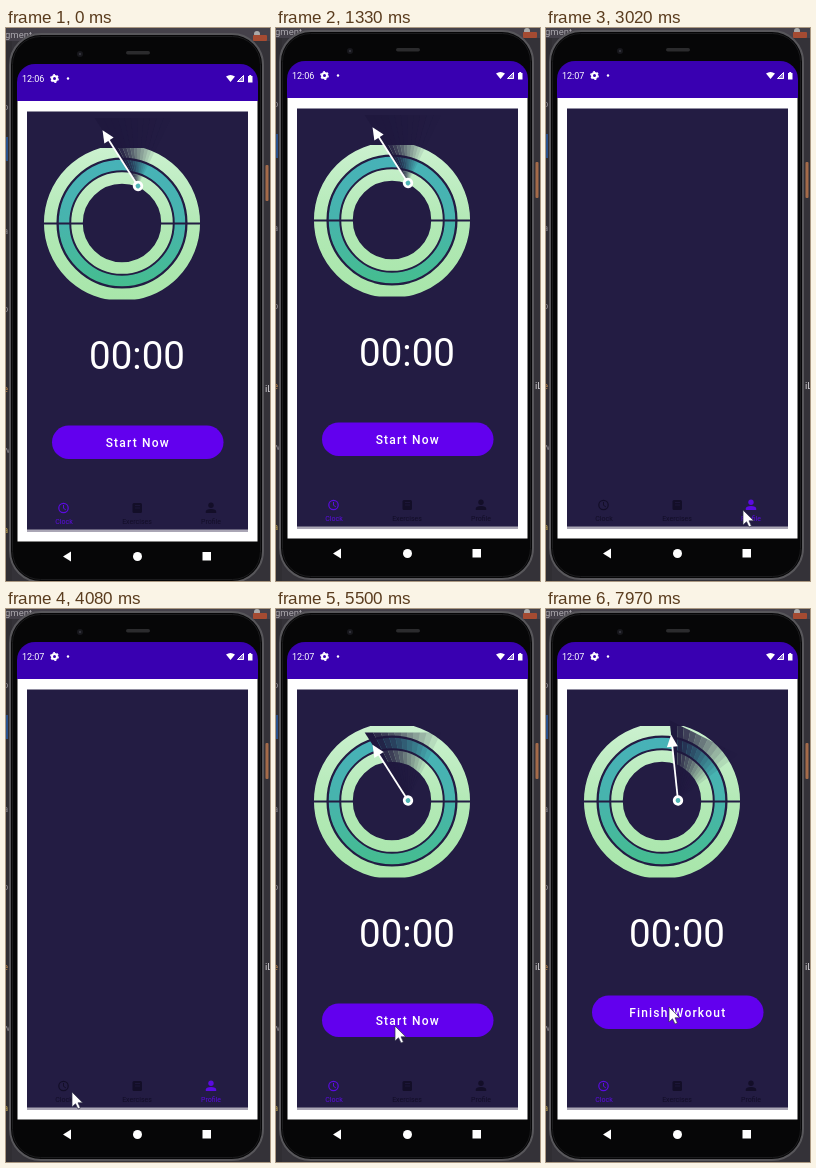
Recreate the animation shown at these times as an HTML page. Size 264 by 553 pixels, loop 8 s.

```html
<!DOCTYPE html>
<html lang="en">
<head>
<meta charset="utf-8">
<title>Workout clock</title>
<style>
html, body { margin: 0; width: 100%; height: 100%; overflow: hidden; background: #343238; }
svg { display: block; width: 264px; height: 553px; font-family: Roboto, sans-serif; }
.label { font-size: 7px; text-anchor: middle; }
.tab { color: #130e28; }
.tab.active { color: #5b0be0; }
.center { text-anchor: middle; fill: #fff; }
</style>
</head>
<body>
<svg viewBox="0 0 264 553">
  <defs>
    <linearGradient id="pale" gradientUnits="userSpaceOnUse" x1="0" y1="117" x2="0" y2="268">
      <stop offset="0" stop-color="#cbf1cf"/><stop offset=".5" stop-color="#b3e9b6"/><stop offset="1" stop-color="#a8e6aa"/>
    </linearGradient>
    <linearGradient id="teal" gradientUnits="userSpaceOnUse" x1="0" y1="129" x2="0" y2="255">
      <stop offset="0" stop-color="#47b2b8"/><stop offset=".5" stop-color="#47b4ad"/><stop offset="1" stop-color="#45bd8f"/>
    </linearGradient>
    <clipPath id="dial"><rect x="36" y="117" width="160" height="151.5"/></clipPath>
    <clipPath id="panel"><rect x="21" y="80" width="221" height="421"/></clipPath>
  </defs>

  <g id="stage">
    <rect y="-5" width="264" height="565" fill="#343238"/>
    <rect y="-5" width="264" height="15" fill="#45414a"/>
    <rect x="0" y="10" width="6" height="550" fill="#302e33"/>
    <g font-size="9.5" fill="#aaa7ad">
      <text x="-1" y="7">gment</text>
      <text x="259" y="361" fill="#d0ced2">iL</text>
      <g fill="#89868c">
        <text x="-3" y="79">o</text><text x="-3" y="203">a</text><text x="-3" y="281">p</text>
        <text x="-3" y="361" fill="#c18a4c">e</text><text x="-3" y="422">w</text><text x="-3" y="502" fill="#c4a650">a</text>
      </g>
    </g>
    <rect x="0" y="106" width="2" height="24" fill="#28518c"/>
    <rect x="259.5" y="134" width="3" height="36" rx="1" fill="#a36a49"/>
    <circle cx="251" cy="3" r="3" fill="#aaa"/>
    <rect x="247" y="4" width="14" height="6" rx="1" fill="#a54b32"/>

    <rect x="4" y="3" width="253" height="548" rx="31" fill="#060607" stroke="#58575b" stroke-width="2"/>
    <rect x="6.5" y="5.5" width="248" height="543" rx="28" fill="none" stroke="#1b1b1d"/>
    <circle cx="74" cy="23" r="3" fill="#17171c"/><circle cx="74" cy="23" r="1.2" fill="#34343c"/>
    <rect x="120" y="20" width="24" height="3.5" rx="1.7" fill="#2b2b2d"/>

    <path d="M11 70V51a18 18 0 0 1 18-18H234a18 18 0 0 1 18 18V70z" fill="#3900b1"/>
    <rect x="11.5" y="70" width="240" height="440.5" fill="#fff"/>
    <rect x="21" y="80.5" width="221" height="420" fill="#231c43"/>
    <rect x="21" y="498.5" width="221" height="2.5" fill="#aaa6b5"/>

    <g fill="#fff">
      <text id="time" x="16" y="51" font-size="9"></text>
      <circle cx="48.5" cy="47.5" r="2.5" fill="none" stroke="#fff" stroke-width="2"/>
      <circle cx="48.5" cy="47.5" r="3.8" fill="none" stroke="#fff" stroke-width="1.2" stroke-dasharray="2 1.98"/>
      <circle cx="62" cy="47.5" r="1.2"/>
      <path d="M220 45.5q4.500-3 9 0L224.500 51z"/>
      <path d="M238 44v7h-7z" fill-opacity=".45"/><path d="M237.500 44.500v6h-6z" fill="none" stroke="#fff"/>
      <path d="M242 45h1.200v-1h2v1h1.300v6.500H242z"/>
      <path d="M57 525.500l8-5v10z"/>
      <circle cx="131.500" cy="525.500" r="4.500"/>
      <rect x="196.500" y="521" width="8.500" height="8.500"/>
    </g>

    <g id="workout" clip-path="url(#panel)">
      <g clip-path="url(#dial)" fill="none">
        <circle cx="116" cy="192" r="71.800" stroke="url(#pale)" stroke-width="12.500"/>
        <circle cx="116" cy="192" r="58" stroke="url(#teal)" stroke-width="10.500"/>
        <circle cx="116" cy="192" r="45" stroke="url(#pale)" stroke-width="11.500"/>
        <path d="M36 192.500H78M154 192.500H196" stroke="#231c43" stroke-width="2"/>
      </g>
      <g id="hand">
        <g id="fan"></g>
        <path d="M0 0V-58" stroke="#fff" stroke-width="1.800"/>
        <path d="M0-66L5.500-54H-5.500z" fill="#fff"/>
        <circle r="3.800" fill="#4fb5b5" stroke="#fff" stroke-width="2.800"/>
      </g>
      <text class="center" x="131" y="338" font-size="38.500">00:00</text>
      <g id="button">
        <rect x="46" y="394.500" width="171.500" height="33.500" rx="16.750" fill="#6200ee"/>
        <text id="action" class="center" x="131.800" y="416" font-size="12" font-weight="500" letter-spacing="1.200"></text>
      </g>
    </g>

    <rect id="ripple" y="467" width="49" height="28" rx="3" fill="#1b1537"/>
    <g class="tab" fill="currentColor">
      <circle cx="57.500" cy="477" r="4.700" fill="none" stroke="currentColor" stroke-width="1.200"/>
      <path d="M57.500 474v3.300l2.300 1.500" fill="none" stroke="currentColor"/>
      <text class="label" x="58" y="493">Clock</text>
    </g>
    <g class="tab" fill="currentColor">
      <rect x="126.500" y="472" width="9.500" height="10" rx="1.500"/>
      <path d="M129 474.500h5M129 477h5" stroke="#231c43" stroke-width=".6"/>
      <text class="label" x="131" y="493">Exercises</text>
    </g>
    <g class="tab" fill="currentColor">
      <circle cx="205" cy="474.300" r="2.700"/>
      <path d="M199.800 482v-1.500q0-2.500 5.200-2.500t5.200 2.500V482z"/>
      <text class="label" x="205" y="493">Profile</text>
    </g>
    <path id="cursor" d="M0 0V15L3.500 11.800L6 17L8.400 16L6 10.800H10.700z" fill="#fff" stroke="#30304a" stroke-width=".7"/>
  </g>
</svg>
<script>
const LOOP = 8000;
const el = id => document.getElementById(id);
const tabs = document.querySelectorAll('.tab');

// Each row: start time, then the values held until the next row.
const scroll = [[0, 3], [80, 2], [350, 1], [800, 0]];
const pointer = [
  [0, -30, 0], [2580, 197, 482],
  [3650, 174, 483], [3730, 128, 483], [3820, 88, 483], [3900, 66, 483],
  [5060, 72, 476], [5150, 84, 460], [5240, 98, 442], [5330, 110, 427], [5410, 117, 419], [5500, 119, 417],
  [6480, 120, 407], [6650, 121, 405], [6920, 121, 404], [7090, 122, 398], [7270, 123, 398]
];
const handAngle = [[0, -32.5], [7630, -27.2], [7720, -21.9], [7800, -16.6], [7890, -11.3], [7970, -6]];
const pressed = [[0, -1], [2580, 0], [2850, -1], [4790, 1], [4970, -1]];
const rippleX = [177, 33];

const held = (steps, t) => steps.findLast(step => step[0] <= t).slice(1);
const within = (t, from, to) => t >= from && t < to;
const show = (node, on) => node.setAttribute('visibility', on ? 'visible' : 'hidden');
const move = (node, x, y, angle = 0) =>
  node.setAttribute('transform', `translate(${x} ${y}) rotate(${angle})`);

// Fading sector behind the hand, bounded by a straight top edge.
function buildFan(slices = 11) {
  const tilt = 32.5 * Math.PI / 180;
  const edge = i => {
    const a = -tilt + i / slices * 1.02;
    const x = 68 * Math.tan(a), y = -68;
    return [x * Math.cos(tilt) - y * Math.sin(tilt), x * Math.sin(tilt) + y * Math.cos(tilt)].map(v => v.toFixed(2));
  };
  el('fan').innerHTML = Array.from({ length: slices }, (_, i) =>
    `<path d="M0 0L${edge(i)}L${edge(i + 1)}z" fill="#1f183e" opacity="${(1 - i / slices).toFixed(2)}"/>`).join('');
}

function draw(t) {
  const onProfile = within(t, 2760, 4880);
  const running = t >= 7630;
  const [ripple] = held(pressed, t);

  move(el('stage'), 0, held(scroll, t)[0]);
  move(el('cursor'), ...held(pointer, t));
  move(el('hand'), 132, t < 1960 ? 155 : 191.5, held(handAngle, t)[0]);
  move(el('button'), 0, running ? -8 : 0);
  el('time').textContent = t < 1960 ? '12:06' : '12:07';
  el('action').textContent = running ? 'Finish Workout' : 'Start Now';
  show(el('workout'), !onProfile);
  show(el('ripple'), ripple >= 0);
  el('ripple').setAttribute('x', rippleX[ripple] ?? 0);
  tabs.forEach((tab, i) => tab.classList.toggle('active', i === (onProfile ? 2 : 0)));
}

buildFan();
const start = performance.now();
function tick() {
  draw((performance.now() - start) % LOOP);
  requestAnimationFrame(tick);
}
tick();
</script>
</body>
</html>
```
